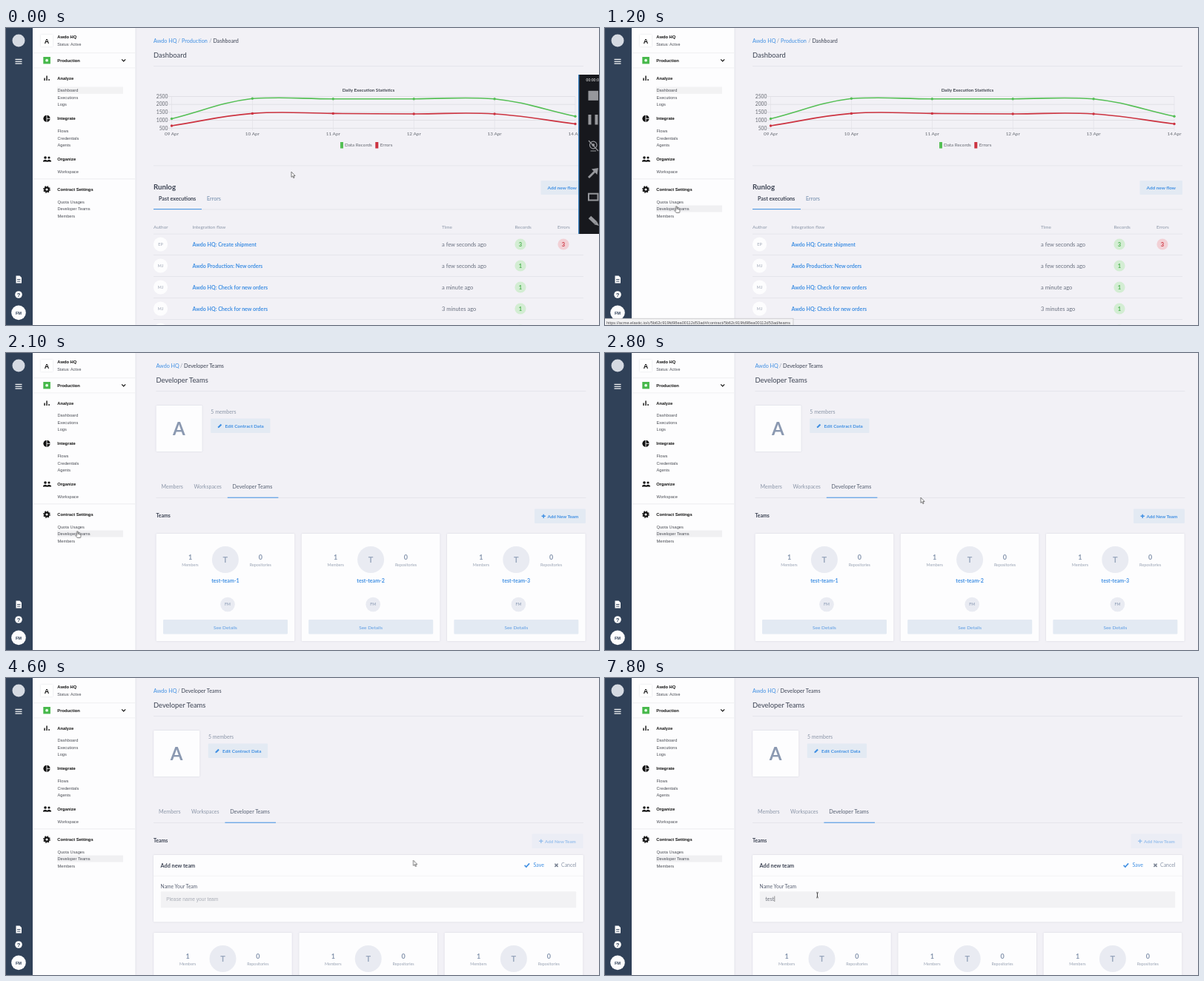
An HTML page that plays this animation: 800x401 px, repeating every 8 s.

```html
<!DOCTYPE html>
<html lang="en">
<head>
<meta charset="utf-8">
<title>Developer Teams</title>
<style>
  html, body { margin: 0; width: 100%; height: 100%; overflow: hidden; background: #f2f1f6; }
  svg { display: block; width: 100%; height: 100%; }
  text { font-family: Lato, "Open Sans", sans-serif; }
  .a { font-family: "Liberation Sans", Arial, sans-serif; }
  .b { font-weight: 700; }
  .m { text-anchor: middle; }
  .e { text-anchor: end; }
  .panel { filter: drop-shadow(0 .6px 1.2px rgba(60, 70, 100, .16)); }

  #pointer { animation: move 8s ease-in-out infinite; }
  @keyframes move {
    0%, 2.5% { transform: translate(385px, 195px); }
    11.25%, 27.5% { transform: translate(96.5px, 241px); }
    35%, 36.25% { transform: translate(426px, 196px); }
    43.75%, 52.5% { transform: translate(733px, 218.5px); }
    63.75%, 100% { transform: translate(282px, 288.5px); }
  }
  #recorder { animation: leave 8s ease-in infinite; }
  @keyframes leave {
    0%, 2.5% { transform: none; }
    7.5%, 100% { transform: translateX(32px); }
  }
</style>
</head>
<body>
<svg id="stage" viewBox="0 0 800 401" xmlns="http://www.w3.org/2000/svg"></svg>
<script>
const LOOP = 8000;
const ORG = 'Awdo';
const BLUE = '#3f8fe3', INK = '#3c4353', MUTED = '#8b96a8', SOFT = '#e3eaf3', RULE = '#e2e3e9';
const GREEN = '#55bf55', RED = '#cc3340';
const rules = [];

const text = (x, y, str, size, fill = INK, cls = '') =>
  `<text x="${x}" y="${y}" font-size="${size}" fill="${fill}" class="${cls}">${str}</text>`;
const rect = (x, y, w, h, fill, more = '') =>
  `<rect x="${x}" y="${y}" width="${w}" height="${h}" fill="${fill}" ${more}/>`;
const disc = (x, y, r, fill, more = '') =>
  `<circle cx="${x}" cy="${y}" r="${r}" fill="${fill}" ${more}/>`;
const path = (d, stroke, width, more = '') =>
  `<path d="${d}" fill="none" stroke="${stroke}" stroke-width="${width}" ${more}/>`;
const shape = (d, fill, more = '') => `<path d="${d}" fill="${fill}" ${more}/>`;
const line = (x, y, w, color = RULE) => rect(x, y, w, .8, color);
const shift = (x, y, body) => `<g transform="translate(${x} ${y})">${body}</g>`;

// Shows the body only inside the given [from, to] windows, in ms.
function during(windows, body) {
  const name = 'show' + rules.length;
  const steps = windows[0][0] > 0 ? ['0%{opacity:0}'] : [];
  for (const [from, to] of windows) {
    steps.push(`${from / LOOP * 100}%{opacity:1}`);
    if (to < LOOP) steps.push(`${to / LOOP * 100}%{opacity:0}`);
  }
  rules.push(`@keyframes ${name}{${steps.join('')}}`);
  return `<g style="animation:${name} ${LOOP}ms step-end infinite">${body}</g>`;
}

function rail() {
  const bars = [41.8, 44.6, 47.4].map(y => rect(12.5, y, 9, 1.2, '#fff')).join('');
  return rect(0, 0, 36, 401, '#304158') + disc(17, 17, 8.5, '#d5dae2') + bars +
    shape('M13.5 334.5h5l2.5 2.5v7.5h-7.5z', '#fff') +
    path('M15 339.5h4.5M15 342h4.5', '#304158', .9) +
    disc(17, 360, 4.8, '#fff') + text(17, 362.7, '?', 7.5, '#304158', 'a b m') +
    disc(17, 384.4, 9.8, '#fdfdfe') + text(17, 386.5, 'FM', 5.7, '#304158', 'a b m');
}

function menu() {
  const groups = [
    [69.8, 'Analyze', 86.2, ['Dashboard', 'Executions', 'Logs']],
    [124.2, 'Integrate', 141, ['Flows', 'Credentials', 'Agents']],
    [179, 'Organize', 195.6, ['Workspace']],
    [219.6, 'Contract Settings', 236.6, ['Quota Usages', 'Developer Teams', 'Members']]
  ];
  const labels = groups.map(([y, head, top, items]) =>
    text(69.3, y, head, 5.8, '#111', 'a b') +
    items.map((s, i) => text(69.5, top + i * 9.5, s, 5.7, '#4a4d55', 'a')).join('')).join('');
  const person = (x, r) => disc(x, 175, r, '#111') +
    shape(`M${x - 3} 180.5v-1.2q3-3 6 0v1.2z`, '#111');
  const icons =
    rect(51.3, 67.5, 1.5, 3.5, '#222') + rect(54.3, 64.5, 1.5, 6.5, '#222') + rect(57.3, 69, 1.5, 2, '#222') +
    disc(55, 122.3, 4.6, '#111') + path('M55 117v10.5M55 122.3h5', '#fdfdfe', .9) +
    person(53, 1.8) + person(58, 1.6) +
    disc(55, 218, 2.7, 'none', 'stroke="#111" stroke-width="2.2"') +
    disc(55, 218, 4.2, 'none', 'stroke="#111" stroke-width="1.3" stroke-dasharray="1.65 1.65"');
  return rect(36, 0, 138.5, 401, '#fdfdfe', 'class="panel"') +
    rect(47, 9, 16, 16, '#fff', 'class="panel"') + text(55, 20.6, 'A', 9, '#111', 'a b m') +
    text(69.3, 14, ORG + ' HQ', 5.8, '#111', 'a b') +
    text(69.3, 23.5, 'Status: Active', 5.3, '#4a4d55', 'a') +
    line(36, 33.3, 138, '#ededf0') + line(36, 53.5, 138, '#ededf0') + line(36, 203.5, 138, '#e8e8ec') +
    rect(50.3, 39, 9.6, 9.4, '#47b84b') + disc(55.1, 43.7, 1.9, '#e8ffe8') +
    text(69.3, 45.8, 'Production', 5.8, '#111', 'a b') +
    path('M156.2 42.4l2.5 2.5 2.5-2.5', '#111', 1.2) +
    during([[0, 1900]], rect(69, 79.5, 89, 9.3, '#f2f2f3')) +
    during([[900, LOOP]], rect(69, 239.5, 89, 9, '#f0f0f2')) +
    icons + labels;
}

// Cubic spline with tension .4; handles stay below the top of the plot.
function spline(xs, ys, color) {
  const last = xs.length - 1;
  const handle = (i, dir) => {
    const a = Math.max(i - 1, 0), b = Math.min(i + 1, last);
    const pull = dir * .4 / (b - a);
    return [xs[i] + pull * (xs[b] - xs[a]), Math.max(92.5, ys[i] + pull * (ys[b] - ys[a]))];
  };
  let d = `M${xs[0]},${ys[0]}`;
  for (let i = 1; i <= last; i++) d += `C${handle(i - 1, 1)} ${handle(i, -1)} ${xs[i]},${ys[i]}`;
  return path(d, color, 1.6) + xs.map((x, i) => disc(x, ys[i], 1.7, color)).join('');
}

function chart() {
  const xs = [0, 1, 2, 3, 4, 5].map(i => 223.5 + i * 108.9);
  const grid = [2500, 2000, 1500, 1000, 500].map((v, i) => {
    const y = 92.5 + i * 10.7;
    return line(219, y - .4, 549, '#dcdce2') + text(218.5, y + 2.2, v, 6.8, '#666a72', 'e');
  }).join('');
  const days = xs.map((x, i) => rect(x - .3, 92.5, .6, 46, '#dfdfe5') +
    text(x, 145.3, (i ? 9 + i : '09') + ' Apr', 6.4, '#666a72', 'm')).join('');
  return text(489, 86.2, 'Daily Execution Statistics', 6.3, '#444952', 'b m') + grid + days +
    spline(xs, [122.5, 95.3, 95.7, 95.7, 95.7, 119.3], GREEN) +
    spline(xs, [132, 115.4, 115.4, 116, 116, 129.5], RED) +
    rect(451, 154, 4, 8.5, GREEN) + text(457, 160.3, 'Data Records', 6.3, '#666a72') +
    rect(498.3, 154, 4, 8.5, RED) + text(504.8, 160.3, 'Errors', 6.3, '#666a72');
}

function row(y, who, name, when, records, errors) {
  const badge = (x, n, bg, fg) => disc(x, y, 7.6, bg) + text(x, y + 2.7, n, 7.5, fg, 'b m');
  return line(199, y + 14.2, 580) + disc(208.5, y, 9.6, '#fdfdfe') +
    text(208.5, y + 1.9, who, 5.4, '#b4bac6', 'b m') +
    text(251.5, y + 2.6, name, 7.05, BLUE, 'b') + text(588, y + 2.6, when, 7.5, '#6a7180') +
    badge(694, records, '#d3edd3', '#4bb04f') + (errors ? badge(752, errors, '#f2d0d5', '#cc3340') : '');
}

function dashboard() {
  const heads = [[199, 'Author'], [251.5, 'Integration flow'], [588, 'Time'], [686.5, 'Records'], [744, 'Errors']];
  const check = ORG + ' HQ: Check for new orders';
  return text(199, 19.6, ORG + ' HQ', 7.2, BLUE) + text(231.7, 19.6, '/', 7.2, MUTED) +
    text(237, 19.6, 'Production', 7.2, BLUE) + text(274.3, 19.6, '/', 7.2, MUTED) +
    text(279.5, 19.6, 'Dashboard', 7.2) + text(199, 40.2, 'Dashboard', 9.4) +
    line(199, 51.2, 580) + chart() + line(199, 185.5, 580) +
    text(199, 218, 'Runlog', 9.7, INK, 'b') +
    rect(721.5, 206, 57.5, 19, SOFT, 'rx="1"') + text(750.2, 218, 'Add new flow', 6.4, BLUE, 'b m') +
    text(206, 233, 'Past executions', 7.2, INK, 'b') + text(271, 233, 'Errors', 7.2, '#6b87a8') +
    line(199, 244.6, 580) + rect(199, 244.1, 65, 1, BLUE) +
    heads.map(([x, s]) => text(x, 271.3, s, 6.4, MUTED)).join('') + line(199, 277.7, 580) +
    row(292, 'EP', ORG + ' HQ: Create shipment', 'a few seconds ago', 3, 3) +
    row(321, 'MJ', ORG + ' Production: New orders', 'a few seconds ago', 1) +
    row(350, 'MJ', check, 'a minute ago', 1) +
    row(379, 'MJ', check, '3 minutes ago', 1) +
    row(408, 'MJ', check, '4 minutes ago', 1);
}

function card(n) {
  const stat = (x, value, label) =>
    text(x, 279, value, 9, '#8494ad', 'b m') + text(x, 288.2, label, 5.4, '#98a2b3', 'm');
  return shift((n - 1) * 196.2, 0,
    rect(202.6, 244, 186.6, 145, '#fdfdfe', 'class="panel" rx="1"') +
    stat(248.5, 1, 'Members') + stat(343.3, 0, 'Repositories') +
    disc(295.9, 279, 18, '#e9ebf2') + text(295.9, 283.1, 'T', 11, '#9aa8be', 'b m') +
    text(295.9, 310.4, 'test-team-' + n, 7.1, BLUE, 'b m') +
    disc(299, 339.5, 9.8, '#e9ebf2') + text(299, 341.4, 'FM', 5.2, '#9aa8be', 'b m') +
    rect(212, 360, 168, 19.5, SOFT, 'rx="1"') + text(295.9, 372.5, 'See Details', 6.5, '#5b9be2', 'm'));
}
const cards = () => [1, 2, 3].map(card).join('');

function teamsHead(buttonOpacity) {
  return text(202.4, 19.6, ORG + ' HQ', 7.2, BLUE) + text(235, 19.6, '/', 7.2, MUTED) +
    text(240, 19.6, 'Developer Teams', 7.2) + text(202.4, 40.2, 'Developer Teams', 9.4) +
    line(202.4, 51.2, 580) +
    rect(202.6, 71, 62, 62, '#fdfdfe', 'class="panel" rx="1"') +
    text(233.4, 111.4, 'A', 24, '#8b99b1', 'b m') +
    text(276.3, 81.6, '5 members', 7, MUTED) +
    rect(276.2, 88.5, 80.3, 19.5, SOFT, 'rx="1"') +
    shape('M285.8 101.2l.4-1.9 3.5-3.5 1.5 1.5-3.5 3.5z', BLUE) +
    text(295.5, 100.8, 'Edit Contract Data', 6.35, BLUE, 'b') +
    text(209.5, 183.2, 'Members', 7.1, MUTED) + text(253.5, 183.2, 'Workspaces', 7, MUTED) +
    text(305.6, 183.2, 'Developer Teams', 7.15, '#566072') +
    line(202.4, 195.2, 580) + rect(298.8, 194.7, 68.6, 1, BLUE) +
    text(202.4, 222.4, 'Teams', 6.95, INK, 'b') +
    `<g opacity="${buttonOpacity}">` + rect(713, 210.5, 69, 19.5, SOFT, 'rx="1"') +
    path('M722.6 220.3h5.2M725.2 217.7v5.2', BLUE, 1.4) +
    text(730.4, 222.6, 'Add New Team', 6.25, BLUE, 'b') + '</g>';
}

function form() {
  const bar = '<tspan fill="#222">|</tspan>';
  const stops = [7000, 7300, 7600, 7700, LOOP];
  const typed = [1, 2, 3, 4].map(n => during([[stops[n - 1], stops[n]]],
    text(216.2, 301.4, 'test'.slice(0, n) + bar, 7, '#6a6e78'))).join('');
  return rect(199, 239, 579.8, 90.3, '#fdfdfe', 'class="panel" rx="1"') +
    text(208.6, 255.8, 'Add new team', 7.25, INK, 'b') + line(199, 266.8, 579.8, '#f0f0f3') +
    path('M699.6 252.8l2.3 2.2 4.2-4.6', BLUE, 1.6) + text(711.5, 255.3, 'Save', 7, BLUE) +
    path('M740.4 250.7l4.2 4.2M744.6 250.7l-4.2 4.2', '#7b8494', 1.6) +
    text(749, 255.3, 'Cancel', 6.95, MUTED) +
    text(208.6, 283.6, 'Name Your Team', 6.75, '#596172') +
    rect(208.8, 288.3, 560.4, 22, '#f2f2f4', 'rx="1"') +
    during([[3700, 7000]], text(216.2, 301.3, 'Please name your team', 6.65, '#a9adb6', 'a')) +
    during([[5400, 5900], [6400, 7000]], rect(216, 295, .8, 7.2, '#333')) + typed;
}

function statusBar() {
  const id = '5b62c919fd98ea00112d53ad';
  return rect(-1, 392.2, 255, 10, '#f3f3f4', 'stroke="#bcbcc0" stroke-width=".7"') +
    text(2, 399.5, `https://acme.elastic.io/c/${id}#/contract/${id}/teams`, 5.62, '#4c4c50', 'a');
}

function recorder() {
  const gray = '#96979c';
  return `<g id="recorder">` + rect(772, 63, 32, 215, '#17181d') + rect(772, 63, 1.4, 215, '#3f86c4') +
    text(782.5, 72, '00:00:00', 5.2, '#fff', 'a') +
    rect(785.5, 84.8, 13.5, 13, gray) + rect(785.5, 117, 4, 13.5, gray) + rect(794.5, 117, 4, 13.5, gray) +
    disc(792.3, 158, 4.8, 'none', `stroke="${gray}" stroke-width="1.2"`) + disc(792.3, 158, 1.9, gray) +
    path('M788.5 166h7.6M786 152l13 14', gray, 1.2) +
    path('M786 202l9-9', gray, 2.8) + shape('M799 189l-1.5 9-7.5-7.5z', gray) +
    rect(786, 223.7, 12.5, 8.8, 'none', `stroke="${gray}" stroke-width="2"`) +
    path('M787.5 255.5l8 7.5', gray, 5) + shape('M793.5 265.2l3.7-4 2.8 5.8z', gray) + '</g>';
}

function pointer() {
  const outline = 'stroke="#444" stroke-width=".7" stroke-linejoin="round"';
  const arrow = shape('M0-.8v7.2l1.7-1.5 1.2 2.7 1.2-.6-1.2-2.5h2.2z', '#fff', outline);
  const hand = shape('M-.9 0q.8-1.2 1.6 0v3.2l3 .7q.9.3.8 1.3l-.7 3.4h-4l-2.4-3.3q.5-1.1 1.7 0z', '#fff', outline);
  const beam = path('M3 1.2h1.1l.4.4.4-.4h1.1M4.5 1.6v6M3 8h1.1l.4-.4.4.4h1.1', '#333', .9);
  return '<g id="pointer">' +
    during([[1500, 1800], [3600, 3900], [5400, 5700]], disc(0, 0, 6.6, '#3a7ac8', 'opacity=".94"')) +
    during([[0, 800], [2300, 4900]], arrow) +
    during([[800, 2300]], hand) +
    during([[4900, LOOP]], beam) + '</g>';
}

document.getElementById('stage').innerHTML =
  rect(0, 0, 800, 401, '#f2f1f6') +
  during([[0, 1900]], dashboard()) +
  during([[1900, 3700]], teamsHead(1) + cards()) +
  during([[3700, LOOP]], shift(-3.4, 0, teamsHead(.5)) + form() + shift(-3.4, 100, cards())) +
  menu() + rail() +
  during([[900, 1900]], statusBar()) +
  recorder() + pointer();

const sheet = document.createElement('style');
sheet.textContent = rules.join('\n');
document.head.append(sheet);
</script>
</body>
</html>
```
